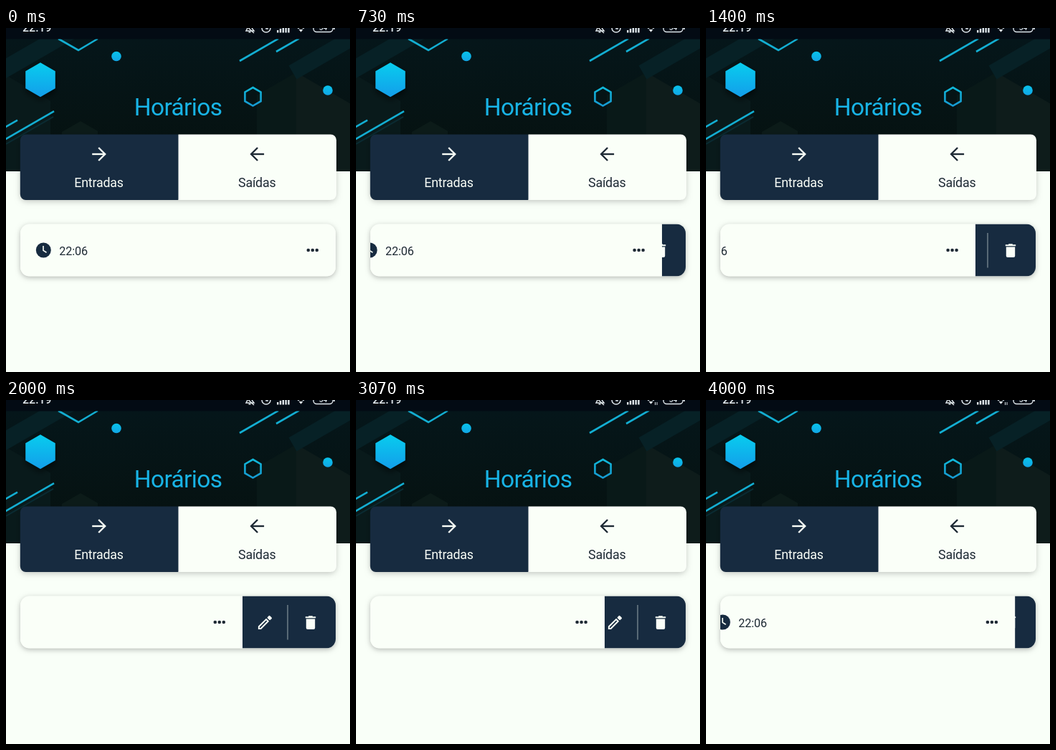
An HTML page with a canvas that plays this animation: 480x480 px, repeating every 4070 ms.

```html
<!DOCTYPE html>
<html lang="pt">
<head>
<meta charset="utf-8">
<style>
html, body { margin: 0; width: 100%; height: 100%; overflow: hidden; background: #f9fff8; }
canvas { display: block; width: 480px; height: 480px; }
</style>
</head>
<body>
<canvas id="stage" width="480" height="480"></canvas>
<script>
const c = document.getElementById('stage').getContext('2d');
const LOOP = 4070, STEPS = 61, OPEN = 130;
const NAVY = '#172b40', PAPER = '#fafff8', INK = '#1f2a35', LIGHT = '#dfe6ea';
const ISO = Math.tan(Math.PI / 6);

const clamp = v => Math.min(1, Math.max(0, v));

// How far the row is dragged left: steady pull, pause, accelerating return
function swipeAt(t) {
  const pull = clamp((t - 300) / 1700) * clamp((t - 530) / 170);
  const back = Math.max(0, (t - 2600) / 1000) ** 1.64;
  return OPEN * pull - 58 * back;
}

function text(s, x, y, size, color, { align = 'center', weight = 400, spacing = 0 } = {}) {
  c.font = `${weight} ${size}px Roboto, sans-serif`;
  c.letterSpacing = spacing + 'px';
  c.textAlign = align;
  c.fillStyle = color;
  c.fillText(s, x, y);
}

function path(points, close) {
  c.beginPath();
  points.forEach(([x, y]) => c.lineTo(x, y));
  if (close) c.closePath();
}

function fill(color, points) {
  path(points, true);
  c.fillStyle = color;
  c.fill();
}

function line(color, width, points, close) {
  path(points, close);
  c.strokeStyle = color;
  c.lineWidth = width;
  c.stroke();
}

function disc(x, y, r, color) {
  c.beginPath();
  c.arc(x, y, r, 0, 7);
  c.fillStyle = color;
  c.fill();
}

function ring(x, y, r, width, from = 0, to = 7) {
  c.beginPath();
  c.arc(x, y, r, from, to);
  c.strokeStyle = LIGHT;
  c.lineWidth = width;
  c.stroke();
}

function box(x, y, w, h, r, color) {
  c.beginPath();
  c.roundRect(x, y, w, h, r);
  c.fillStyle = color;
  c.fill();
}

function at(x, y, draw, angle = 0) {
  c.save();
  c.translate(x, y);
  c.rotate(angle);
  draw();
  c.restore();
}

function shade(y, half, top, bottom) {
  const g = c.createLinearGradient(0, y - half, 0, y + half);
  g.addColorStop(0, top);
  g.addColorStop(1, bottom);
  return g;
}

function shadowed(draw, blur, dy, alpha) {
  c.save();
  c.shadowColor = `rgba(0,0,0,${alpha})`;
  c.shadowBlur = blur;
  c.shadowOffsetY = dy;
  draw();
  c.restore();
}

const hexagon = (x, y, r) => Array.from({ length: 6 }, (_, i) => {
  const a = i * Math.PI / 3 - Math.PI / 2;
  return [x + r * Math.cos(a), y + r * Math.sin(a)];
});

// Stroke rising at 30 degrees
const slant = (x, y, dx, color = '#13aed2', width = 2.6) =>
  line(color, width, [[x, y], [x + dx, y - dx * ISO]]);

// Isometric column with its top corner at x, y
function column(x, y, left, right, dark, pale) {
  fill(dark, [[x, y], [x, 200], [x - left, 200], [x - left, y + left * ISO]]);
  fill(pale, [[x, y], [x, 200], [x + right, 200], [x + right, y + right * ISO]]);
}

function header() {
  c.fillStyle = shade(107, 92, '#05161a', '#06110f');
  c.fillRect(0, 0, 480, 199.5);
  column(0, 66, 0, 62, '#091a1b', '#091a1b');
  column(405, 62, 55, 75, '#091918', '#0e1c1b');
  column(104, 130, 26, 24, '#0c1b19', '#0c1b19');
  slant(-10, 62, 110, '#072126', 24);
  slant(400, 62, 100, '#072126', 22);
  slant(0, 162, 66, '#0a2b32', 2);

  line('#13aed2', 2.6, [[73, 15], [101, 31], [128, 15]]);
  slant(326, 46, 54);
  slant(377, 33, 32);
  slant(-2, 139, 18);
  slant(-2, 156, 69);

  shadowed(() => fill(shade(72, 24, '#08cdee', '#139eea'), hexagon(48, 72.3, 24)), 8, 4, .6);
  line(shade(96, 14, '#10b8d8', '#1699d2'), 2.6, hexagon(344.5, 95.8, 12.8), true);
  for (const [x, y] of [[154, 39.5], [449, 87]]) disc(x, y, 6.8, shade(y, 7, '#08c3ea', '#12a6e6'));

  text('Horários', 240, 121.5, 33.5, '#18b4e6', { spacing: -0.65 });
}

function statusBar(t) {
  c.fillStyle = '#030b14';
  c.fillRect(0, 0, 480, 15.5);
  text('22:19', 23, 5, 16, LIGHT, { align: 'left', weight: 500 });

  // Muted bell
  line(LIGHT, 1.5, [[338, -2], [335, 4], [346, 4], [343, 0]]);
  line(LIGHT, 1.5, [[335, -3], [346, 7]]);
  box(338.5, 5, 3, 1.5, 0, LIGHT);

  ring(363, 0, 6, 1.5);
  line(LIGHT, 1.4, [[363, -3], [363, 1], [366, 1]]);
  for (let i = 0; i < 5; i++) box(378 + i * 3.8, 3 - i * 2, 2.4, 3.5 + i * 2, 0, LIGHT);

  ring(411.5, 5, 6, 1.8, Math.PI * 1.25, Math.PI * 1.75);
  fill(LIGHT, [[408.5, 2], [414.5, 2], [411.5, 5.8]]);
  if (t > 2900) for (const x of [417, 419.5]) box(x, 3, 1, 4, 0, LIGHT);

  c.beginPath();
  c.roundRect(429, -8, 27, 13.5, 4.5);
  c.lineWidth = 1.4;
  c.stroke();
  box(457, -3, 1.8, 5, 0, LIGHT);
  text('54', 442.5, 3, 10, LIGHT, { weight: 500 });
}

function arrow(x, y, dir, color) {
  at(x, y, () => {
    line(color, 2.4, [[-9.6 * dir, 0], [8.4 * dir, 0]]);
    line(color, 2.4, [[-.6 * dir, -9], [8.4 * dir, 0], [-.6 * dir, 9]]);
  });
}

function pencil() {
  line(PAPER, 2, [[-11.5, 0], [-9.6, 1.9], [4.8, 1.9], [4.8, -1.9], [-9.6, -1.9]], true);
  box(7.2, -2.8, 4.8, 5.6, 1.2, PAPER);
}

function bin() {
  box(-2.8, -9.4, 5.6, 2, 0, PAPER);
  box(-7.2, -8.4, 14.4, 2.1, 0, PAPER);
  box(-6.2, -5.2, 12.4, 14.6, [0, 0, 2, 2], PAPER);
}

function tab(label, x, dir, radii, back, front) {
  box(x, 148.5, 220.5, 91.5, radii, back);
  arrow(x + 110, 176, dir, front);
  text(label, x + 109.7, 222, 17.8, front, { spacing: -0.2 });
}

function tabs() {
  shadowed(() => box(20.5, 149.5, 439.5, 90, 8, NAVY), 9, 2, .25);
  tab('Entradas', 19.8, 1, [8, 0, 0, 8], NAVY, PAPER);
  tab('Saídas', 240.5, -1, [0, 8, 8, 0], PAPER, INK);
}

function row(shift) {
  const x = 20, y = 273.5, w = 440, h = 73;
  shadowed(() => box(x, y, w, h, 13, PAPER), 7, 2, .27);
  c.save();
  c.beginPath();
  c.roundRect(x, y, w, h, 13);
  c.clip();

  if (shift > 0) {
    box(x + w - shift, y, shift, h, 0, NAVY);
    box(392.5, 286, 1, 48.5, 0, '#9aa7ac');
    at(361, 310.8, pencil, -Math.PI / 4);
    at(425, 310.6, bin);
  }

  c.translate(-shift, 0);
  box(x, y, w, h, 0, PAPER);
  disc(52.3, 310, 10.5, NAVY);
  line(PAPER, 1.6, [[52, 304], [52, 310.4], [56.5, 313.2]]);
  text('22:06', 74.2, 317, 16.2, INK, { align: 'left', spacing: -0.1 });
  for (let i = 0; i < 3; i++) disc(421.8 + i * 6, 310, 2.3, INK);
  c.restore();
}

function draw(now) {
  const step = Math.floor(((now % LOOP) + 4) / LOOP * STEPS) % STEPS;
  const t = step * LOOP / STEPS;
  box(0, 0, 480, 480, 0, '#f9fff8');
  header();
  statusBar(t);
  tabs();
  row(swipeAt(t));
}

const start = performance.now();
function tick() {
  draw(performance.now() - start);
  requestAnimationFrame(tick);
}
tick();
</script>
</body>
</html>
```
